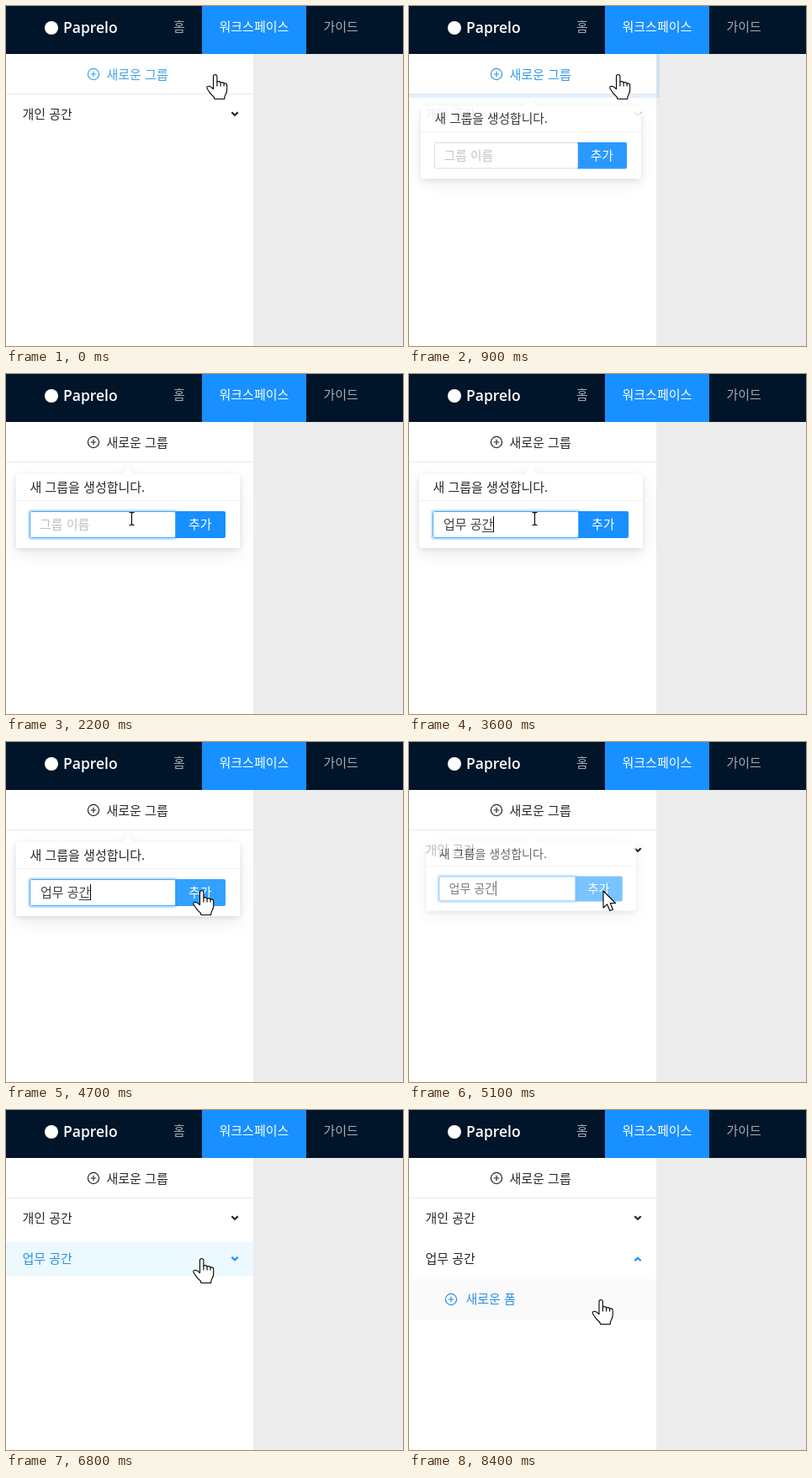
Write an HTML page that moves like this. It is 472x404 px and loops after 9000 ms.

```html
<!DOCTYPE html>
<html lang="ko">
<head>
<meta charset="utf-8">
<title>새로운 그룹</title>
<style>
  html, body { margin: 0; width: 100%; height: 100%; overflow: hidden; background: #ececec; }
  svg { display: block; width: 472px; height: 404px; }
  text { font: 350 15px "Noto Sans CJK KR", "Noto Sans CJK", sans-serif; white-space: pre; fill: #262626; }
  .brand { font: 600 17.5px "Open Sans", sans-serif; fill: #fff; }
  .nav { fill: #a6adb4; }
  .on { fill: #fff; }
  .line { fill: none; stroke: currentColor; stroke-width: 1.2; }
  .chevron { fill: none; stroke: currentColor; stroke-width: 2.2; }
  .tint text { fill: currentColor; }
  .card { fill: #fff; filter: drop-shadow(0 2px 3px rgba(0,0,0,.1)) drop-shadow(0 7px 10px rgba(0,0,0,.07)); }
  #popover { transform-origin: 145px 105px; }
  .cursor { fill: #fff; stroke: #000; stroke-width: 1.1; stroke-linejoin: round; }
</style>
</head>
<body>
<svg viewBox="0 0 472 404">
  <defs>
    <g id="plus" class="line"><circle r="6.6"/><path d="M-3.3 0H3.3M0-3.3V3.3"/></g>
    <path id="arrowhead" class="chevron" d="M-3.7-1.8L0 1.8L3.7-1.8"/>
  </defs>

  <rect width="472" height="404" fill="#ececec"/>
  <rect y="57" width="294" height="347" fill="#fff"/>
  <rect id="wave" fill="#1890ff"/>
  <rect width="472" height="57" fill="#001529"/>
  <rect x="233" width="124" height="57" fill="#1890ff"/>
  <circle cx="54" cy="26" r="8" fill="#fff"/>
  <text class="brand" x="68" y="32">Paprelo</text>
  <text class="nav" x="199" y="30">홈</text>
  <text class="on" x="253.5" y="30">워크스페이스</text>
  <text class="nav" x="377.5" y="30">가이드</text>

  <rect y="57" width="294" height="48" fill="#fff"/>
  <rect y="104" width="294" height="1" fill="#e8e8e8"/>
  <g id="newGroup" class="tint">
    <use href="#plus" x="104" y="81"/>
    <text x="119.5" y="86.5">새로운 그룹</text>
  </g>

  <text x="19.5" y="134">개인 공간</text>
  <use href="#arrowhead" x="272" y="128" color="#262626"/>

  <g id="group">
    <rect id="groupBg" y="157" width="294" height="40" fill="#e6f7ff"/>
    <g id="groupName" class="tint"><text x="19.5" y="182">업무 공간</text></g>
    <g id="groupArrow"><use href="#arrowhead"/></g>
    <rect id="subBg" y="201" width="294" fill="#fafafa"/>
    <g id="newForm" class="tint">
      <use href="#plus" x="50" y="225"/>
      <text x="67.5" y="230">새로운 폼</text>
    </g>
  </g>

  <g id="popover">
    <path class="card" d="M14 119H137L145 111L153 119H276Q278 119 278 121V205Q278 207 276 207H14Q12 207 12 205V121Q12 119 14 119Z"/>
    <text x="28.5" y="140">새 그룹을 생성합니다.</text>
    <rect x="12" y="150" width="266" height="1" fill="#f0f0f0"/>
    <path id="add" d="M201 163H259Q261 163 261 165V193Q261 195 259 195H201Z"/>
    <text class="on" x="217" y="184">추가</text>
    <rect id="glow" x="27" y="162" width="176" height="34" rx="3" fill="none" stroke="#1890ff" stroke-width="2"/>
    <rect id="input" x="28.5" y="163.5" width="173" height="31" rx="2" fill="#fff"/>
    <text id="hint" x="40" y="184" style="fill:#bfbfbf">그룹 이름</text>
    <text id="value" x="41" y="184" style="fill:#404040"></text>
    <rect id="underline" y="187" height="1" fill="#404040"/>
    <rect id="caret" y="169" width="1" height="19" fill="#000"/>
  </g>

  <g id="pointer" class="cursor">
    <g id="hand" transform="translate(2.5 -.5)">
      <path d="M-3 17V2.2a2.2 2.2 0 0 1 4.4 0V8.5q3.4-1.2 4.2 1q3.2-1 4 1q3.6-.8 3.6 2.5V18q0 3-1.6 5.5q-1.4 2.5-1.4 5.5H-1.5q0-2.5-3-4.5q-2.5-2-4-5l-2-3q-.8-2.4 1.5-2.8q2.5-.2 6 3.3z"/>
      <path d="M1.4 8.5V14M5.6 9.5V14M9.6 10.5V14" fill="none"/>
    </g>
    <path id="arrow" d="M0 0V20L4.6 15.8L7.8 23.5L11.4 22L8.3 14.5H14.5Z"/>
    <path id="beam" d="M-3-7.5H-1L0-6.5L1-7.5H3M0-6.5V6.5M-3 7.5H-1L0 6.5L1 7.5H3" fill="none"/>
  </g>
</svg>

<script>
const LOOP = 9000, STEP = 100;
const DARK = [38, 38, 38], BLUE = [24, 144, 255], LIGHT = [64, 169, 255], DEEP = [9, 109, 217], GREY = [217, 217, 217];
const LINK = [40, 144, 232], LINK_HOVER = [60, 162, 232];
const el = Object.fromEntries([...document.querySelectorAll('[id]')].map(e => [e.id, e]));

const set = (e, attrs) => { for (const k in attrs) e.setAttribute(k, attrs[k]); };
const show = (e, on) => { e.style.display = on ? '' : 'none'; };
const ramp = (t, start, length) => Math.min(1, Math.max(0, (t - start) / length));
const pulse = (t, up, down, length) => ramp(t, up, length) - ramp(t, down, length);
const mix = (a, b, p) => `rgb(${a.map((v, i) => Math.round(v + (b[i] - v) * p))})`;

function bezier(x1, y1, x2, y2) {
  const at = (a, b, s) => 3 * a * s * (1 - s) ** 2 + 3 * b * s * s * (1 - s) + s ** 3;
  return x => {
    let lo = 0, hi = 1;
    for (let i = 0; i < 24; i++) {
      const mid = (lo + hi) / 2;
      if (at(x1, x2, mid) < x) lo = mid; else hi = mid;
    }
    return x <= 0 ? 0 : x >= 1 ? 1 : at(y1, y2, lo);
  };
}
const outCirc = bezier(.08, .82, .17, 1);
const inOutCirc = bezier(.78, .14, .15, .86);
const smooth = bezier(.4, 0, .4, 1);

// time, x, y of the pointer's hot spot
const route = [
  [1000, 247, 82], [1600, 149.5, 172], [4300, 149.5, 172], [4700, 231, 177],
  [7500, 231, 177], [8000, 228, 227], [8300, 228, 227], [8400, 226.5, 226]
];
const typing = [
  [0, ''], [2400, 'ㅇ'], [2500, '어'], [2600, '업'], [2800, '업ㅁ'], [2900, '업무'], [3000, '업무 '],
  [3100, '업무 ㄱ'], [3200, '업무 공'], [3300, '업무 공ㄱ'], [3400, '업무 공가'], [3600, '업무 공간']
];

function drawPointer(t) {
  let [, x, y] = route[0];
  for (let i = 1; i < route.length; i++) {
    const [t0] = route[i - 1], [t1, x1, y1] = route[i];
    const p = smooth(ramp(t, t0, t1 - t0));
    x += (x1 - x) * p;
    y += (y1 - y) * p;
  }
  set(el.pointer, { transform: `translate(${x} ${y})` });
  const kind = t >= 5600 || t <= 1100 ? 'hand' : t < 1500 ? 'arrow' : t < 4600 ? 'beam' : t < 5000 ? 'hand' : 'arrow';
  for (const k of ['hand', 'arrow', 'beam']) show(el[k], k === kind);
}

function drawInput(t) {
  const focus = ramp(t, 1600, 300);
  const [typedAt, text] = typing.filter(([at]) => t >= at).pop();
  set(el.input, { stroke: mix(GREY, LIGHT, focus) });
  set(el.glow, { opacity: .25 * focus });
  show(el.hint, !text);
  el.value.textContent = text;

  const width = text ? el.value.getComputedTextLength() : 0;
  const last = text ? el.value.getSubStringLength(text.length - 1, 1) : 0;
  const composing = text && !text.endsWith(' ') && t < 4900;
  show(el.underline, composing);
  set(el.underline, { x: 41 + width - last, width: last });

  const blinkFrom = t >= 4900 ? 4900 : Math.max(typedAt, 1700);
  show(el.caret, t >= 1700 && (t - blinkFrom) % 1000 < 500);
  set(el.caret, { x: text ? Math.round(41 + width) : 40 });
}

function drawPopover(t) {
  const opened = outCirc(ramp(t, 825, 200)) - inOutCirc(ramp(t, 5015, 200));
  show(el.popover, opened > 0);
  if (opened <= 0) return;
  el.popover.style.opacity = opened;
  el.popover.style.transform = `scale(${.8 + .2 * opened})`;
  set(el.add, { fill: mix(BLUE, LIGHT, ramp(t, 4500, 300)) });
  drawInput(t);
}

function drawNewGroup(t) {
  const spread = 6 * outCirc(ramp(t, 845, 400));
  const fade = .17 * (1 - outCirc(ramp(t, 845, 2000)));
  set(el.wave, { x: -spread, y: 57 - spread, width: 294 + 2 * spread, height: 48 + 2 * spread, opacity: t < 845 ? 0 : fade });
  const press = .5 * pulse(t, 700, 800, 150);
  el.newGroup.style.color = t < 1650 ? mix(LINK_HOVER, DEEP, press) : mix(LINK_HOVER, DARK, ramp(t, 1650, 300));
}

function drawGroup(t) {
  show(el.group, t >= 5600);
  const hover = ramp(t, 5550, 300);
  const opened = smooth(ramp(t, 6850, 300));
  el.groupName.style.color = mix(DARK, LINK, hover - ramp(t, 7600, 300));
  el.groupArrow.style.color = mix(DARK, BLUE, hover);
  set(el.groupArrow, { transform: `translate(272 ${176.5 + opened}) scale(1 ${1 - 2 * opened})` });
  set(el.groupBg, { opacity: pulse(t, 6650, 6850, 200) });
  set(el.subBg, { height: 48 * opened });
  set(el.newForm, { opacity: opened });
  el.newForm.style.color = mix(DARK, LINK, ramp(t, 7700, 300));
}

function frame() {
  const t = Math.floor(performance.now() % LOOP / STEP) * STEP;
  drawNewGroup(t);
  drawGroup(t);
  drawPopover(t);
  drawPointer(t);
  requestAnimationFrame(frame);
}
frame();
</script>
</body>
</html>
```
